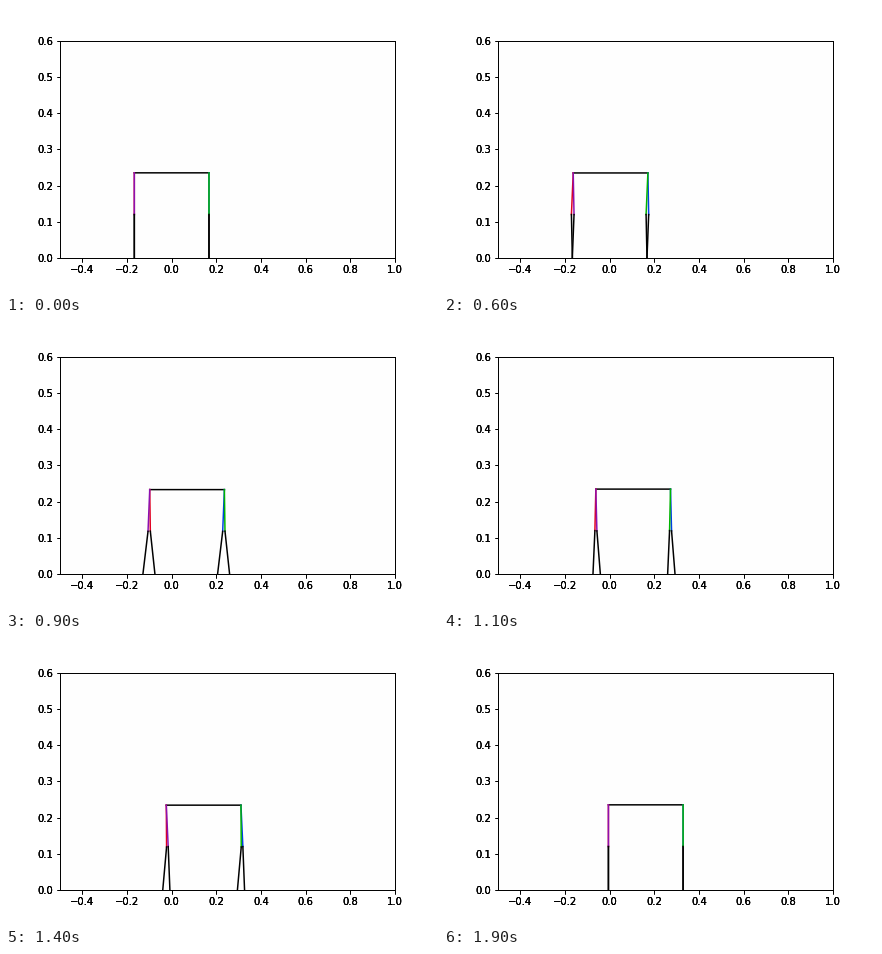
Recreate the animation shown at these times as a matplotlib script. Size 432 by 288 pixels, loop 2000 ms.

```python
import numpy as np
import matplotlib.pyplot as plt
from matplotlib.animation import FuncAnimation

FRAMES, STEP = 20, 100
SHANK, THIGH = 0.12, 0.115
REAR, FRONT = -0.167, 0.1675
PX = 1 / 223.2  # one stage pixel in x data units

# Forward travel in pixels at a few times (ms)
TIMES = [0, 400, 600, 900, 1200, 1600, 1900]
HIP = [0, 0.1, 0.9, 15.4, 26.7, 35.1, 36.1]
KNEE_A = [0, 0, -0.9, 16.0, 25.4, 36.2, 36.1]
KNEE_B = [0, 0.1, 1.7, 13.7, 28.7, 36.3, 36.1]
FOOT_A = [0, 0, 0, 20.6, 20.7, 36.1, 36.1]
FOOT_B = [0, 0, 0, 8.6, 34.1, 36.1, 36.1]


def glide(t, values):
    """Monotone cubic curve through the key values, in data units."""
    x, y = np.array(TIMES, float), np.array(values, float)
    h = np.diff(x)
    d = np.diff(y) / h
    slope = np.zeros(len(x))
    for i in range(1, len(d)):
        if d[i - 1] * d[i] > 0:
            slope[i] = 2 * d[i - 1] * d[i] / (d[i - 1] + d[i])
    i = min(max(np.searchsorted(x, t, side="right") - 1, 0), len(h) - 1)
    u = (t - x[i]) / h[i]
    pos = (y[i] * (1 + 2 * u) * (1 - u) ** 2 + y[i + 1] * u * u * (3 - 2 * u)
           + h[i] * u * (1 - u) * (slope[i] * (1 - u) - slope[i + 1] * u))
    return pos * PX


def rise(length, dx):
    return np.sqrt(length ** 2 - dx ** 2)


fig = plt.figure(figsize=(6, 4), dpi=72, facecolor="white")
fig.subplots_adjust(left=0.125, right=0.9, bottom=0.125, top=0.88)
plt.rcParams.update({"font.family": "DejaVu Sans", "font.size": 10})

# Stacked axes thicken the soft edges of the labels
for layer in range(3):
    ax = fig.add_axes([0.125, 0.125, 0.775, 0.755], label=f"layer{layer}")
    ax.set(xlim=(-0.5, 1), ylim=(0, 0.6))
    ax.set_facecolor("#fefefe" if layer == 0 else "none")


def line(color):
    return ax.plot([], [], color=color, lw=1.5, snap=False)[0]


body = line("black")
LEGS = [
    (REAR, KNEE_A, FOOT_A, "#e00020"),
    (REAR, KNEE_B, FOOT_B, "#8c10b0"),
    (FRONT, KNEE_B, FOOT_B, "#0040e0"),
    (FRONT, KNEE_A, FOOT_A, "#00b400"),
]
legs = [(base, knee, foot, line(color), line("black"))
        for base, knee, foot, color in LEGS]


def draw(n):
    t = n * STEP
    hip = glide(t, HIP)
    knees = [(glide(t, k), glide(t, f))
             for k, f in ((KNEE_A, FOOT_A), (KNEE_B, FOOT_B))]
    height = np.mean([rise(SHANK, k - f) + rise(THIGH, hip - k)
                      for k, f in knees])
    body.set_data([REAR + hip, FRONT + hip], [height, height])
    for base, knee, foot, thigh, shank in legs:
        k, f = glide(t, knee), glide(t, foot)
        ky = rise(SHANK, k - f)
        thigh.set_data([base + hip, base + k], [height, ky])
        shank.set_data([base + k, base + f], [ky, 0])
    return [body] + [part for leg in legs for part in leg[3:]]


anim = FuncAnimation(fig, draw, frames=FRAMES, interval=STEP,
                     init_func=lambda: draw(0), repeat=True, repeat_delay=0)
plt.show()
```
